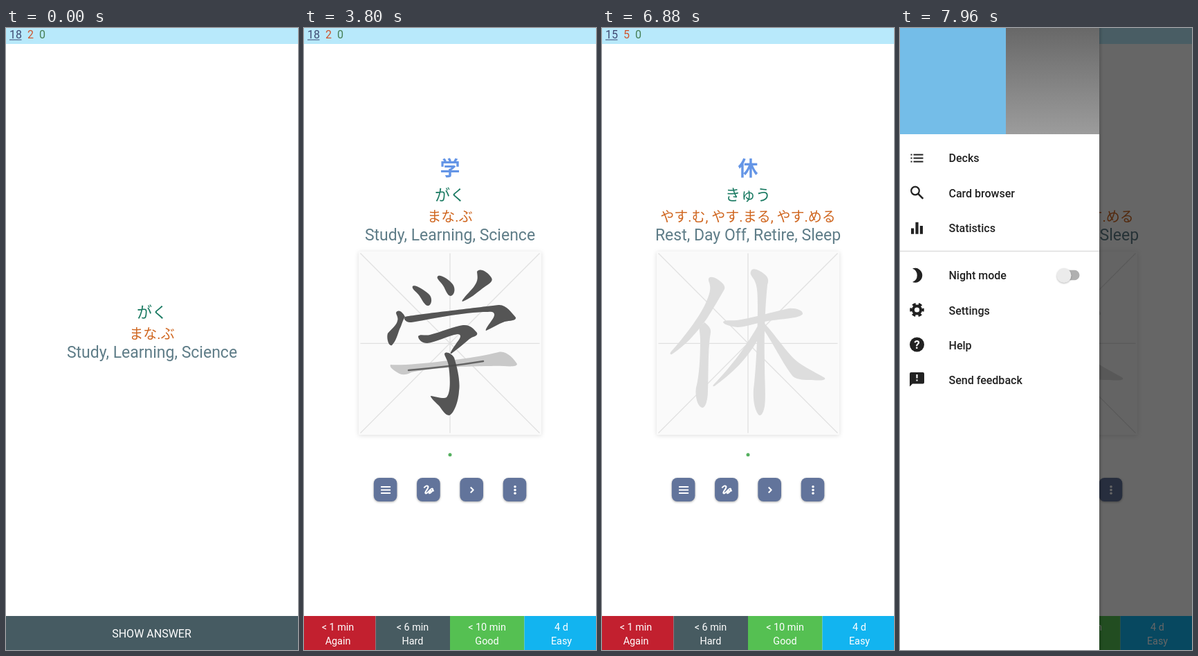
Write an HTML page that moves like this. It is 422 by 896 pixels and loops after 8000 ms.

```html
<!DOCTYPE html>
<html lang="ja">
<head>
<meta charset="utf-8">
<title>Kanji flashcards</title>
<style>
html, body { margin: 0; width: 100%; height: 100%; overflow: hidden; background: #fff; }
svg { display: block; width: 100vw; height: 100vh; }
text { font-family: Roboto, "Noto Sans CJK JP", "Noto Sans CJK", sans-serif; }
.mid text { text-anchor: middle; }
.kanji { font: 700 29px "Noto Sans CJK JP", "Noto Sans CJK", sans-serif; fill: #6495e6; }
.on { font-size: 22px; fill: #1a7a62; }
.kun { font-size: 20px; fill: #cf651e; }
.en { font-size: 23px; fill: #5f7d88; }
.counts { font-size: 16px; }
.grade { font-size: 14.4px; fill: #fff; }
.show { font-size: 16px; fill: #fff; }
.pad { fill: #fafafa; filter: drop-shadow(0 1px 3px #0002); }
.guide { stroke: #e0e0e0; stroke-width: 1.3; fill: none; }
.outline { fill: #ddd; }
.button { fill: #62749b; filter: drop-shadow(0 1px 1.5px #0005); }
.icon { fill: none; stroke: #fff; stroke-width: 2; stroke-linejoin: round; }
.menu text { font-size: 16px; font-weight: 500; fill: #212121; }
.menu .mark { fill: #fff; font-size: 17px; font-weight: 700; text-anchor: middle; }

.scene { visibility: hidden; animation: 8s step-end infinite; }
#ask1 { animation-name: ask1; }
#write1 { animation-name: write1; }
#folded1 { animation-name: folded1; }
#ask2 { animation-name: ask2; }
#write2 { animation-name: write2; }
@keyframes ask1 { 0% { visibility: visible } 3.75%, 100% { visibility: hidden } }
@keyframes write1 { 0% { visibility: hidden } 3.75% { visibility: visible } 61.625%, 100% { visibility: hidden } }
@keyframes folded1 { 0% { visibility: hidden } 61.625% { visibility: visible } 70.375%, 100% { visibility: hidden } }
@keyframes ask2 { 0% { visibility: hidden } 70.375% { visibility: visible } 75.625%, 100% { visibility: hidden } }
@keyframes write2 { 0% { visibility: hidden } 75.625%, 100% { visibility: visible } }

.ink { fill: #555; animation: ink 8s linear infinite backwards; }
@keyframes ink { 0% { opacity: 0 } 2.5%, 56% { opacity: 1 } 56.01%, 100% { opacity: 0 } }
.finger {
  fill: none; stroke: #484848; stroke-width: 2.5; stroke-linecap: round; stroke-linejoin: round;
  stroke-dasharray: 1 2; animation: finger 8s linear infinite backwards;
}
@keyframes finger {
  0% { opacity: 0; stroke-dashoffset: 1 }
  .01% { opacity: .9; stroke-dashoffset: 1 }
  3% { opacity: .9; stroke-dashoffset: 0 }
  5.5%, 100% { opacity: 0; stroke-dashoffset: 0 }
}

.scrim { opacity: 0; animation: scrim 8s infinite; }
.menu { transform: translateX(-294px); animation: slide 8s infinite; }
@keyframes scrim {
  0%, 86.625% { opacity: 0; animation-timing-function: cubic-bezier(.25, .46, .45, .94) }
  91.625%, 100% { opacity: .6 }
}
@keyframes slide {
  0%, 86.6% { transform: translateX(-294px); animation-timing-function: step-end }
  86.625% { transform: translateX(-288px); animation-timing-function: cubic-bezier(.25, .46, .45, .94) }
  91.625%, 100% { transform: none }
}
</style>
</head>
<body>
<svg id="stage" viewBox="0 0 422 896" preserveAspectRatio="none"></svg>
<script>
const study = {
  counts: [18, 2, 0], kanji: '学', on: 'がく', kun: 'まな.ぶ', en: 'Study, Learning, Science',
  strokes: [
    'M157 372C160 369 172 376 180 383C186 388 185 398 180 400C175 401 171 392 167 386C163 380 155 376 157 372Z',
    'M193 358C196 354 207 361 213 367C220 373 218 385 212 386C207 386 205 377 201 371C197 365 191 361 193 358Z',
    'M250 351C253 345 265 350 271 360C274 366 266 369 258 375C249 382 240 390 229 394C226 393 240 380 246 372C252 364 251 359 250 351Z',
    'M133 410C137 404 143 410 146 416C142 422 142 426 138 434C135 442 133 451 127 457C122 459 119 446 121 440C126 434 134 428 135 422C137 417 133 413 133 410Z',
    'M146 416C160 413 240 404 281 399C292 398 300 410 306 417C307 422 298 421 290 423C281 426 272 432 263 436C261 434 270 424 274 417C277 411 274 408 266 409C230 409 180 420 155 424C148 424 143 420 146 416Z',
    'M165 444C168 440 175 444 182 442C198 438 216 430 230 428C240 427 246 434 250 439C252 444 244 444 239 448C230 456 221 463 213 469C209 470 215 462 221 453C227 446 228 441 222 441C208 443 190 453 178 454C171 454 165 449 165 444Z',
    'M203 469C205 465 214 469 217 475C222 490 226 510 224 523C223 538 217 555 210 558C203 558 200 549 194 543C189 538 183 533 183 530C190 531 202 535 206 532C213 524 211 500 209 487C208 478 203 473 203 469Z',
    'M125 485C140 486 170 484 200 480C240 476 265 471 281 467C292 464 303 476 308 484C307 490 290 486 270 487C220 487 180 491 155 496C148 500 143 500 138 498C130 493 123 489 125 485Z'
  ],
  // [start in ms, path of the finger]
  fingers: [
    [330, 'M160 374L180 396'], [530, 'M197 360L213 383'], [730, 'M264 354L233 390'],
    [930, 'M139 412L127 452'], [1110, 'M146 420L292 404L268 432'],
    [1900, 'M170 446L236 434L216 466'], [2850, 'M209 470Q224 520 212 550L188 534'],
    [3532, 'M151 493Q210 488 259 480']
  ]
};
const rest = {
  counts: [15, 5, 0], kanji: '休', on: 'きゅう', kun: 'やす.む, やす.まる, やす.める', en: 'Rest, Day Off, Retire, Sleep',
  strokes: [
    'M154 364C153 357 160 358 167 362C175 367 180 373 176 378C168 392 160 405 152 418C135 442 118 459 101 470C98 471 98 468 100 466C118 446 140 418 150 396C157 380 158 374 154 364Z',
    'M148 424C153 428 158 432 157 439C153 460 154 495 153 522C153 535 150 547 145 547C138 546 134 530 136 518C141 500 142 470 142 450C142 440 140 434 141 431Z',
    'M175 424C176 420 185 422 195 421C220 417 250 408 270 404C280 403 291 407 290 412C287 418 260 419 240 422C220 426 205 431 196 431C186 430 176 427 175 424Z',
    'M215 351C217 344 226 348 234 354C241 359 241 364 239 370C236 400 234 440 235 480C235 510 237 530 235 545C233 556 229 560 226 557C221 550 218 538 219 520C223 490 225 440 225 400C225 378 224 368 218 360C215 356 214 354 215 351Z',
    'M228 424C215 448 190 485 161 514C159 517 162 517 165 514C195 492 215 470 230 440Z',
    'M233 424C245 435 260 458 275 474C285 485 305 494 322 504C324 508 315 508 303 507C293 507 283 507 276 502C262 485 248 455 232 432Z'
  ],
  fingers: []
};

const rect = (x, y, w, h, fill, more = '') =>
  `<rect x="${x}" y="${y}" width="${w}" height="${h}" fill="${fill}" ${more}/>`;
const label = (x, y, str, cls = '', more = '') => `<text x="${x}" y="${y}" class="${cls}" ${more}>${str}</text>`;
const path = (d, cls = '', more = '') => `<path d="${d}" class="${cls}" ${more}/>`;
const shift = (y, body) => `<g transform="translate(0 ${y})">${body}</g>`;

const topBar = ([fresh, again, due]) => rect(0, 0, 422, 23, '#b8e9fb') +
  label(5, 15, fresh, 'counts', 'fill="#3f4a72"') + rect(5, 16.5, 17.5, 1, '#3f4a72') +
  label(31, 15, again, 'counts', 'fill="#cf552e"') + label(48, 15, due, 'counts', 'fill="#457f55"');

const words = card => `<g class="mid">${label(211, 247.5, card.on, 'on')}${
  label(211, 279, card.kun, 'kun')}${label(211, 306, card.en, 'en')}</g>`;
const kanji = card => `<g class="mid">${label(211, 212.5, card.kanji, 'kanji')}</g>`;

const icons = {
  lines: path('M-7-4.5h14M-7 0h14M-7 4.5h14', 'icon'),
  scribble: path('M-7-3C-5-6-2-7-1-5C0-2-6 2-5 4.5C-3 7 2-2 5-2C8-1 2 6 .5 4.5C-1 1 6 1 7.5 1', 'icon'),
  next: path('M-2-4l4 4-4 4', 'icon'),
  dots: [-4.8, 0, 4.8].map(y => `<circle cy="${y}" r="1.8" fill="#fff"/>`).join('')
};
const button = (x, y, icon) => `<g transform="translate(${x} ${y})">${
  rect(-16.8, -17, 33.6, 34, '#62749b', 'rx="8" class="button"')}<g transform="translate(.5 .5)">${icons[icon]}</g></g>`;

const grades = () => [
  [0, 103.5, 49, '#c2202f', '&lt; 1 min', 'Again'],
  [103.5, 107.5, 157, '#475b61', '&lt; 6 min', 'Hard'],
  [211, 107.5, 264.5, '#55c052', '&lt; 10 min', 'Good'],
  [318.5, 103.5, 372, '#12b4f0', '4 d', 'Easy']
].map(([x, w, mid, fill, wait, name]) => `<g class="mid">${rect(x, 847, w, 49, fill)}${
  label(mid, 868, wait, 'grade')}${label(mid, 887.5, name, 'grade')}</g>`).join('');

const pad = card => rect(79, 322, 264, 264, '#fafafa', 'class="pad"') +
  path('M81.5 324.5L340.5 583.5M340.5 324.5L81.5 583.5M211 324.5V583.5M81.5 454.3H340.5', 'guide') +
  card.strokes.map(d => path(d, 'outline')).join('') +
  card.fingers.map(([start], i) => path(card.strokes[i], 'ink', `style="animation-delay:${start + 240}ms"`)).join('') +
  card.fingers.map(([start, d]) => path(d, 'finger', `pathLength="1" style="animation-delay:${start}ms"`)).join('') +
  '<circle cx="211" cy="614.7" r="2.5" fill="#55b060"/>';

const scene = (id, card, body) => `<g id="${id}" class="scene">${topBar(card.counts)}${body}</g>`;
const ask = card => shift(169, words(card)) + rect(0, 847, 422, 49, '#465b62') +
  `<g class="mid">${label(210.5, 878, 'SHOW ANSWER', 'show')}</g>`;
const write = card => kanji(card) + words(card) + pad(card) + grades() +
  ['lines', 'scribble', 'next', 'dots'].map((icon, i) => button(117.6 + 62.3 * i, 665, icon)).join('');
const folded = card => shift(159, kanji(card) + words(card)) + grades() +
  button(180, 506, 'lines') + button(242, 506, 'dots');

const menuItems = [
  [187.5, 'Decks', path('M-9-5h2m2 0H9M-9 0h2m2 0H9M-9 5h2m2 0H9', '', 'stroke="#212121" stroke-width="2.1"')],
  [238, 'Card browser', '<circle cx="-2.5" cy="-3.5" r="5.8" fill="none" stroke="#212121" stroke-width="2.2"/>' +
    path('M1.8 .8L8.8 7.8', '', 'stroke="#212121" stroke-width="2.6"')],
  [288.5, 'Statistics', path('M-6.4 8.3V0M0 8.3V-8.7M6.4 8.3V-3.4', '', 'stroke="#212121" stroke-width="4.2"')],
  [356.5, 'Night mode', path('M-6.5-10A10.5 10.5 0 1 1-6.5 9.6A10.5 10.5 0 0 0-6.5-10Z', '', 'fill="#212121"')],
  [407, 'Settings', '<g fill="none" stroke="#212121"><circle cy="-1" r="5.6" stroke-width="4"/>' +
    '<circle cy="-1" r="8.5" stroke-width="3.6" stroke-dasharray="4.8 4.1" stroke-dashoffset="2.4"/></g>'],
  [457, 'Help', '<circle cy="-1" r="10.5" fill="#212121"/>' + label(0, 5, '?', 'mark')],
  [507.5, 'Send feedback', path('M-8.5-11.5H8.5a2 2 0 0 1 2 2V3a2 2 0 0 1-2 2H-6.5L-10.5 9V-9.5a2 2 0 0 1 2-2Z', '', 'fill="#212121"') +
    path('M0-8.5v5.5M0-1v2.1', '', 'stroke="#fff" stroke-width="2.1"')]
];
const menu = () => `<g class="menu">${rect(288, 0, 5, 896, 'url(#edge)')}${rect(0, 0, 288, 896, '#fff')}${
  rect(0, 0, 288, 153, 'url(#header)')}${rect(0, 0, 153, 153, '#74bde8')}${
  rect(0, 320.8, 288, 1.4, '#dcdcdc')}${
  menuItems.map(([y, name, icon]) => `<g transform="translate(24.5 ${y})">${icon}</g>` + label(70.5, y + 5.7, name)).join('')}${
  rect(229, 348.8, 30.5, 14.4, '#b0b0b0', 'rx="7.2"')}
  <circle cx="237" cy="356.5" r="10.5" fill="#ebebeb" style="filter:drop-shadow(0 1px 1px #0004)"/></g>`;

document.getElementById('stage').innerHTML = `<defs>
  <linearGradient id="header" x2="0" y2="1"><stop stop-color="#686868"/><stop offset="1" stop-color="#9c9c9c"/></linearGradient>
  <linearGradient id="edge"><stop stop-opacity=".14"/><stop offset="1" stop-opacity="0"/></linearGradient>
</defs>` + rect(0, 0, 422, 896, '#fff') +
  scene('ask1', study, ask(study)) + scene('write1', study, write(study)) + scene('folded1', study, folded(study)) +
  scene('ask2', rest, ask(rest)) + scene('write2', rest, write(rest)) +
  rect(0, 0, 422, 896, '#000', 'class="scrim"') + menu();
</script>
</body>
</html>
```
